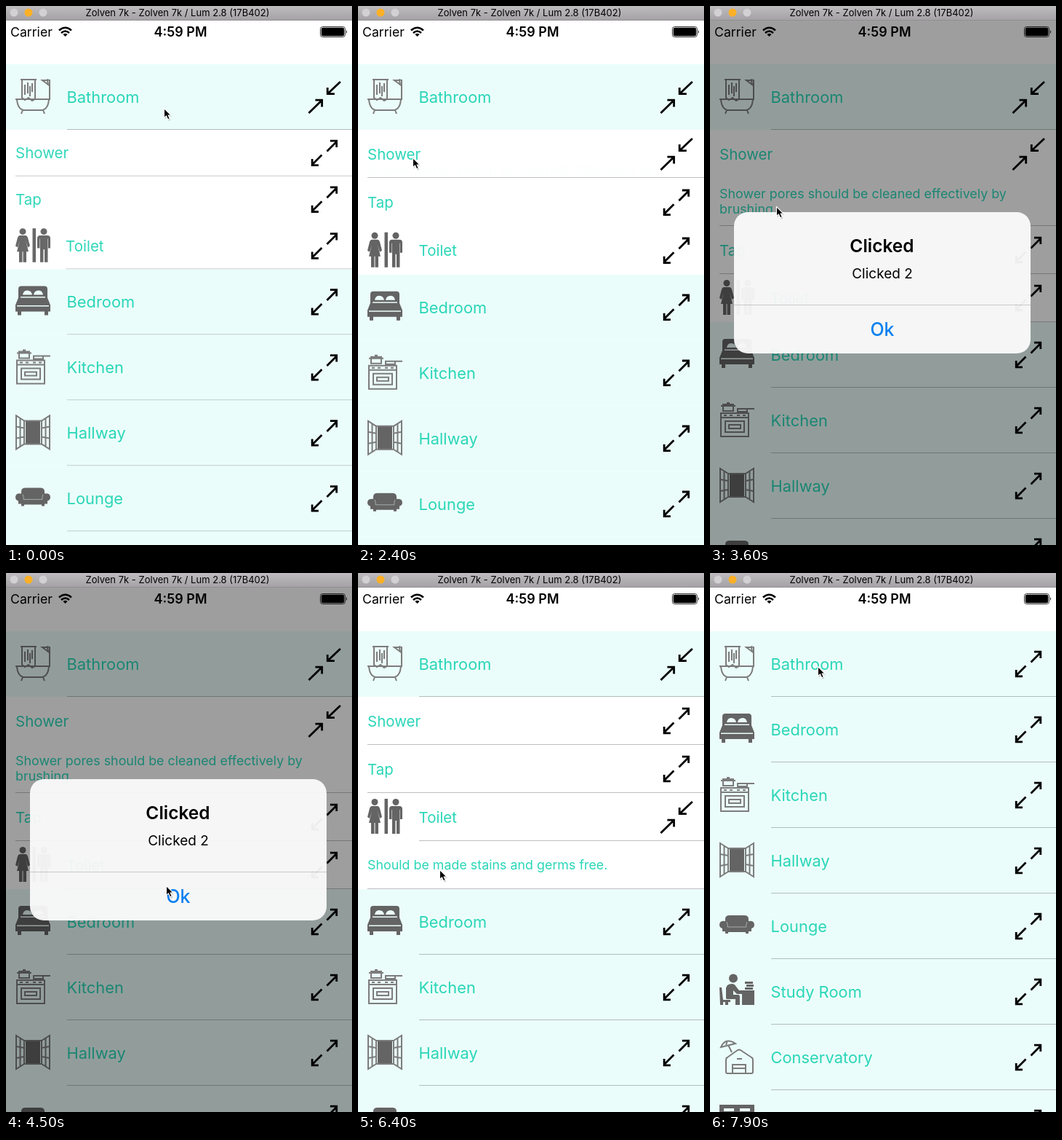
These frames come from a looping animation (476 by 740 pixels, 8000 ms). An HTML page:

```html
<!DOCTYPE html>
<html lang="en">
<head>
<meta charset="utf-8">
<title>Room list</title>
<style>
  html, body { margin: 0; width: 100%; height: 100%; overflow: hidden; background: #fff; }
  svg { display: block; width: 476px; height: 740px; }
  text { font-family: Inter, Roboto, "Liberation Sans", sans-serif; }
  .main { font-size: 21.9px; fill: #2ad6b8; }
  .sub { font-size: 20.5px; fill: #2ad6b8; }
  .note { font-size: 17.85px; fill: #2ad6b8; }
  .arrow { fill: none; stroke: #000; stroke-width: 2.8; }
  .thin { fill: none; stroke: #7c7c7c; stroke-width: 2; }
  .solid { fill: #646464; }
  .pale { fill: #ecfdfa; }
  .mid { text-anchor: middle; }
</style>
</head>
<body>
<svg viewBox="0 0 476 740">
  <defs>
    <linearGradient id="bar" x2="0" y2="1">
      <stop stop-color="#bfbcbf"/><stop offset="1" stop-color="#a3a1a3"/>
    </linearGradient>
    <g id="bath">
      <path class="thin" d="M7 1H29M9 2V26L13 29L18 26L23 30L27 28V2M13 8V22M17 5V20M20 10V24M23 6V18M47 27V2L43 1M0 28H48M2 28Q3 42 12 43H36Q45 42 46 28M10 43L8 48M38 43L40 48"/>
      <path class="thin" d="M37 2H44L45 8Z"/>
    </g>
    <g id="bed">
      <path class="solid" d="M4 19V7Q4 3 8 3H40Q44 3 44 7V19L48 29V38H45V43H40V38H8V43H3V38H0V29Z"/>
      <path class="pale" d="M10 15Q11 9 16 9Q22 9 23 15ZM25 15Q26 9 32 9Q37 9 38 15ZM7 17.500H41V19H7ZM2 29.500H46V31H2Z"/>
    </g>
    <g id="stove">
      <path class="thin" d="M5 3H19V12H5ZM2 5H22M10 1H14M38 9H48M25 9H38V13H25ZM2 15H40V47H2ZM2 21H40M8 26H34V41H8ZM13 31H29V36H13ZM6 18H10M14 18H18M24 18H28M32 18H36"/>
    </g>
    <g id="window">
      <path class="solid" d="M14 8H34V40H14Z"/>
      <path class="thin" d="M1 1L12 8V40L1 47ZM47 1L36 8V40L47 47ZM6.500 5V43M41.500 5V43M1 16L12 18M1 32L12 30M47 16L36 18M47 32L36 30M12 8H36M12 40H36"/>
    </g>
    <g id="sofa">
      <path class="solid" d="M8 18V15Q8 10 14 10H34Q40 10 40 15V18Q48 17 48 23Q48 27 44 28V32H40V35H36V33H12V35H8V32H4V28Q0 27 0 23Q0 17 8 18Z"/>
      <path d="M10 19Q12 24 11 26H37Q36 24 38 19" fill="none" stroke="#a5abaa" stroke-width="1"/>
    </g>
    <g id="desk">
      <circle class="solid" cx="19" cy="6.500" r="6"/>
      <path class="solid" d="M9 34V20Q10 14 17 14Q21 14 23 18L27 23H48V43H31V28H24L19 23V29H26Q28 29 28 32V43H22V35H10ZM0 19H3L5 36H15V39H12V43H8V39H5V43H1ZM35 11H46V14H35ZM37 15H47V18H37ZM35 19H46V22H35Z"/>
    </g>
    <g id="house">
      <path class="thin" d="M9 45V28Q9 26 11 25L25 15Q27 14 29 15L44 25Q46 26 46 28V45Q46 47 44 47H11Q9 47 9 45ZM18 47V35H36V47M18 40H36M24 27H31M2 11Q8-3 22 6ZM12 8L17 18M9 8L11 2"/>
    </g>
    <g id="shed">
      <path class="solid" d="M0 0H48V48H0Z"/>
      <path class="pale" d="M6 5H20V9H6ZM28 5H42V9H28Z"/>
    </g>
    <g id="people">
      <circle class="solid" cx="10" cy="4.5" r="4.5"/>
      <circle class="solid" cx="39" cy="4.5" r="4.5"/>
      <path class="solid" d="M6 10H14Q16 10 17 13L20 25L17 27L14 17L18 33H15V48H10.500V33H9.500V48H5V33H2L6 17L3 27L0 25L3 13Q4 10 6 10ZM23.500 0H28V48H23.500ZM34 10H44Q48 10 48 14V28H45V15H44.500V48H40V30H38.500V48H34V15H33.500V28H30V14Q30 10 34 10Z"/>
    </g>
  </defs>

  <rect width="476" height="740" fill="#fff"/>
  <g id="list"></g>
  <rect id="dim" y="20" width="476" height="720"/>

  <g id="alert">
    <rect x="33" y="283" width="408" height="194" rx="19" fill="#fbfbfb" fill-opacity=".945"/>
    <rect x="33" y="410" width="408" height="1" fill="#000" fill-opacity=".18"/>
    <g class="mid">
      <text x="236.500" y="338" font-size="24.5" font-weight="600">Clicked</text>
      <text x="237" y="374" font-size="19">Clicked 2</text>
      <text x="237" y="453" font-size="25" font-weight="500" fill="#0a80f0">Ok</text>
    </g>
  </g>

  <rect width="476" height="20" fill="url(#bar)"/>
  <rect y="19" width="476" height="1" fill="#929092"/>
  <circle cx="11" cy="9" r="5.5" fill="#d2d0d2"/>
  <circle cx="31" cy="9" r="5.5" fill="#fdb027"/>
  <circle cx="51" cy="9" r="5.5" fill="#d2d0d2"/>
  <text class="mid" x="236" y="14" font-size="13">Zolven 7k - Zolven 7k / Lum 2.8 (17B402)</text>

  <text x="6" y="42" font-size="17.7">Carrier</text>
  <text class="mid" x="240" y="42" font-size="18" font-weight="600">4:59 PM</text>
  <g fill="none" stroke="#000" stroke-width="2.6">
    <path d="M73 33.500Q81.500 26 90 33.500M76 37Q81.500 32 87 37"/>
    <path d="M78.500 39Q81.500 36.500 84.500 39L81.500 42Z" fill="#000" stroke="none"/>
  </g>
  <rect x="432.500" y="28.500" width="34" height="14" rx="3" fill="none" stroke="#000" stroke-width=".8"/>
  <rect x="433.800" y="29.800" width="31.400" height="11.400" rx="2"/>
  <path d="M468 33Q470 35.500 468 38Z"/>

  <g id="cursor">
    <path d="M1 2V15L4 12L6 17L9 16L7 11H11Z" opacity=".2"/>
    <path d="M0 0V13L3 10.400L5.200 15.300L7.800 14.200L5.700 9.500H9.600Z" stroke="#fff" stroke-width="1.100"/>
  </g>
</svg>

<script>
const LOOP = 8000, SLIDE = 300;
const BATH_IN = -264, SHOWER_IN = 2380, SWAP = 5700, BATH_OUT = 7400;

const EXPAND = 'M441.500 -2.500L455 -16M446 -16.800H454.800V-8M434.500 2.500L421 16M421.200 8V16.800H430';
const COLLAPSE = 'M460 -21L442.500 -4.500M442.300 -13V-4.300H452M416.500 22L434.500 4.500M425.500 4.200H434.700V13.500';

const $ = id => document.getElementById(id);
const ease = u => (1 - Math.cos(Math.PI * Math.min(1, Math.max(0, u)))) / 2;
const ramp = (t, start, span = SLIDE) => ease((t - start) / span);
const within = (t, a, b) => t >= a && t < b;

const bathGrow = t => ramp(t, BATH_IN) - ramp(t, BATH_OUT);
const bathOpen = t => t < BATH_OUT;
const showerOpen = t => within(t, SHOWER_IN, SWAP);
const toiletOpen = t => within(t, SWAP, BATH_OUT);

const room = (label, icon, open) => ({ kind: 'main', label, icon, open });
const item = (label, open, icon) => ({ kind: 'sub', label, icon, open, grow: bathGrow });
const note = (lines, grow) => ({ kind: 'note', lines, grow });

const rows = [
  room('Bathroom', 'bath', bathOpen),
  item('Shower', showerOpen),
  note(['Shower pores should be cleaned effectively by', 'brushing.'],
    t => ramp(t, SHOWER_IN) - ramp(t, SWAP)),
  item('Tap'),
  item('Toilet', toiletOpen, 'people'),
  note(['Should be made stains and germs free.'],
    t => ramp(t, SWAP) - ramp(t, BATH_OUT)),
  room('Bedroom', 'bed'),
  room('Kitchen', 'stove'),
  room('Hallway', 'window'),
  room('Lounge', 'sofa'),
  room('Study Room', 'desk'),
  room('Conservatory', 'house'),
  room('Garden Shed', 'shed')
];

function add(parent, tag, attrs, text) {
  const node = document.createElementNS('http://www.w3.org/2000/svg', tag);
  for (const key in attrs) node.setAttribute(key, attrs[key]);
  if (text) node.textContent = text;
  return parent.appendChild(node);
}

function build(row) {
  const main = row.kind === 'main';
  row.full = main ? 90 : 66;
  row.left = row.icon ? 84 : 13;
  row.g = add($('list'), 'g', {});
  row.back = add(row.g, 'rect', { width: 476, fill: main ? '#ebfdfa' : '#fff' });
  row.body = add(row.g, 'g', {});
  if (row.icon) row.pic = add(row.body, 'use', { href: '#' + row.icon });
  if (row.lines) {
    const first = row.lines.length > 1 ? -5 : 6;
    row.lines.forEach((line, i) =>
      add(row.body, 'text', { class: 'note', x: 13, y: first + i * 21 }, line));
  } else {
    row.text = add(row.body, 'text', { class: row.kind, y: main ? 8 : 7.5 }, row.label);
    row.arrow = add(row.body, 'path', { class: 'arrow' });
  }
  row.line = add(row.g, 'rect', { height: 1, width: 476, fill: '#000', 'fill-opacity': .25 });
}
rows.forEach(build);

// Separators vanish while the table reloads its cells.
function lineShown(row, t) {
  if (row.label === 'Shower') return !within(t, 2500, SWAP);
  if (within(t, SHOWER_IN, SHOWER_IN + SLIDE)) return false;
  if (row.label !== 'Tap') return true;
  return ![BATH_IN, SWAP, BATH_OUT].some(s => within(t, s, s + SLIDE));
}

function drawList(t) {
  let y = 80;
  for (const row of rows) {
    const grow = row.grow ? row.grow(t) : 1;
    const h = row.full * grow;
    row.g.style.display = h < .05 ? 'none' : '';
    row.g.setAttribute('transform', `translate(0 ${y})`);
    row.back.setAttribute('height', h);
    row.body.setAttribute('transform', `translate(0 ${h / 2})`);
    row.body.setAttribute('opacity', grow);
    const left = row.left - (row.kind === 'sub' && row.icon ? (1 - grow) * 43 : 0);
    if (row.pic) row.pic.setAttribute('transform', `translate(13 ${-1 - 24 * grow}) scale(1 ${grow})`);
    if (row.text) {
      row.text.setAttribute('x', left - (row.icon ? .5 : 0));
      row.arrow.setAttribute('d', row.open && row.open(t) ? COLLAPSE : EXPAND);
    }
    row.line.setAttribute('x', left);
    row.line.setAttribute('y', h - 1);
    row.line.style.display = lineShown(row, t) ? '' : 'none';
    y += h;
  }
}

function drawAlert(t) {
  const enter = ramp(t, 3355, 245);
  const shown = enter - ramp(t, 4500, 255);
  const scale = 1.2 - .2 * enter;
  $('dim').setAttribute('opacity', .38 * shown);
  $('alert').setAttribute('opacity', shown);
  $('alert').setAttribute('transform', `translate(237 380) scale(${scale}) translate(-237 -380)`);
}

// time, x, y
const path = [
  [0, 217.5, 140.5], [500, 217.5, 140.5], [1900, 75.5, 208.5], [2600, 75.5, 208.5],
  [3100, 91.5, 275.5], [3650, 91.5, 275.5], [4400, 220.5, 429.5], [4750, 220.5, 429.5],
  [5500, 112.5, 407.5], [6400, 112.5, 407.5], [7250, 148.5, 128.5], [LOOP, 148.5, 128.5]
];

function drawCursor(t) {
  const i = path.findIndex(p => p[0] > t);
  const [t0, x0, y0] = path[i - 1], [t1, x1, y1] = path[i];
  const k = ease((t - t0) / (t1 - t0));
  $('cursor').setAttribute('transform', `translate(${x0 + (x1 - x0) * k} ${y0 + (y1 - y0) * k})`);
}

const start = performance.now();
function tick() {
  const t = Math.max(0, performance.now() - start) % LOOP;
  drawList(t);
  drawAlert(t);
  drawCursor(t);
  requestAnimationFrame(tick);
}
tick();
</script>
</body>
</html>
```
